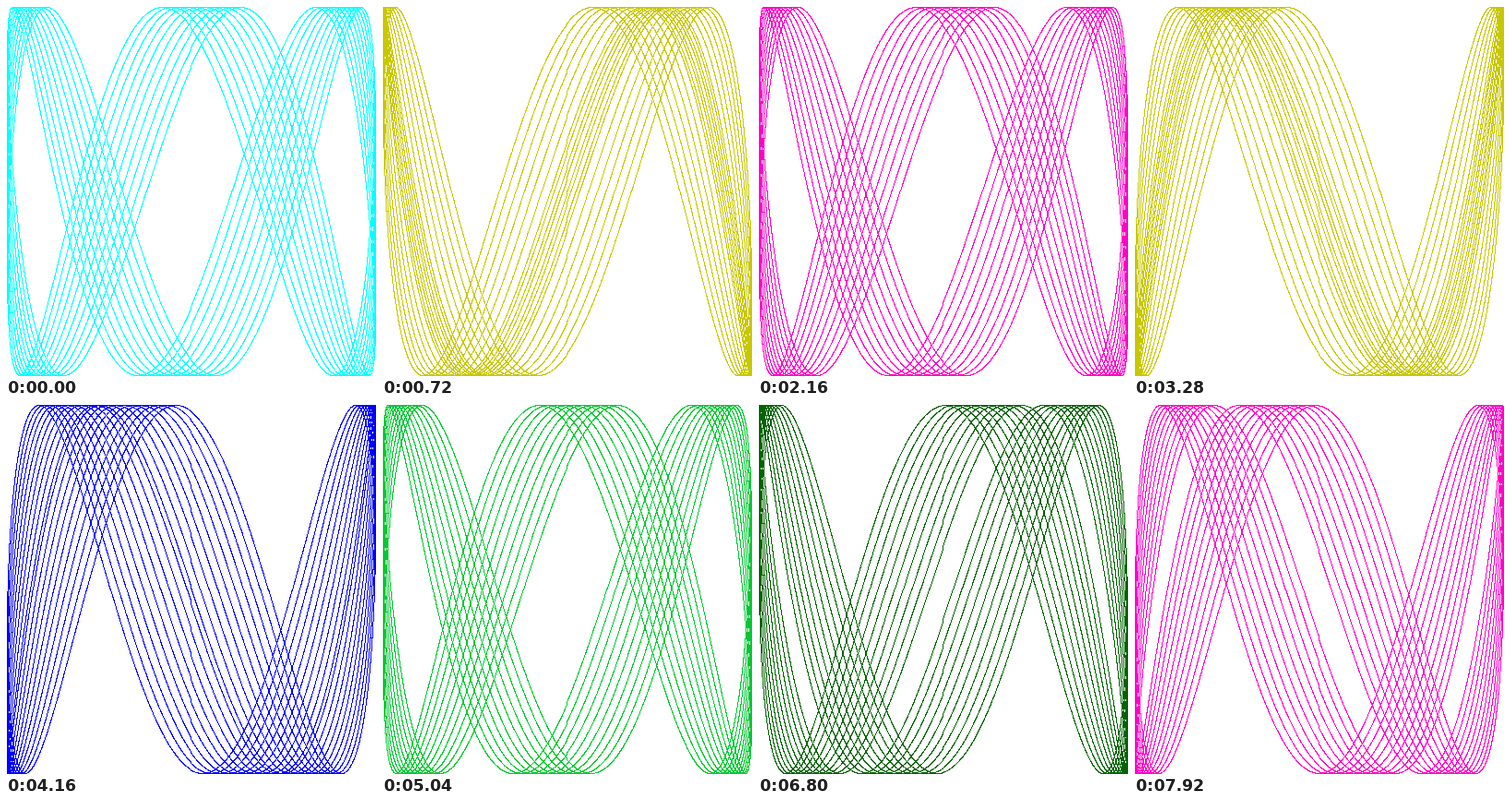
These frames come from a looping animation (401 px wide and 401 px high, 8 s). An HTML page with a canvas:

```html
<!DOCTYPE html>
<html>
<head>
<meta charset="utf-8">
<title>Lissajous</title>
<style>
html, body { margin: 0; width: 100%; height: 100%; overflow: hidden; background: #fff; }
canvas { display: block; }
</style>
</head>
<body>
<canvas id="stage" width="401" height="401"></canvas>
<script>
const SIZE = 200, SIDE = 2 * SIZE + 1;
const CYCLES = 10, STEP = 0.001, FREQ = 3.023;
const DELAY = 80, FRAMES = 100, PHASE = 5.767;
const COLORS = ['#00ffff', '#c8c800', '#ff0000', '#ff00c8', '#0000ff', '#006400', '#ff6400', '#00c832'];

const ctx = document.getElementById('stage').getContext('2d');
const pixel = v => SIZE + Math.trunc(v * SIZE + 0.5);

function draw(n) {
  const phase = PHASE + n * 0.1;
  const image = ctx.createImageData(SIDE, SIDE);
  const dots = new Uint32Array(image.data.buffer).fill(0xffffffff);
  const rgb = parseInt(COLORS[n % COLORS.length].slice(1), 16);
  const ink = (0xff000000 | (rgb & 255) << 16 | (rgb & 0xff00) | rgb >> 16) >>> 0;
  for (let t = 0; t < CYCLES * 2 * Math.PI; t += STEP) {
    dots[pixel(Math.sin(t * FREQ + phase)) * SIDE + pixel(Math.cos(t))] = ink;
  }
  ctx.putImageData(image, 0, 0);
}

let shown = -1;
function tick() {
  const n = Math.floor(performance.now() / DELAY) % FRAMES;
  if (n !== shown) draw(shown = n);
  requestAnimationFrame(tick);
}
tick();
</script>
</body>
</html>
```
